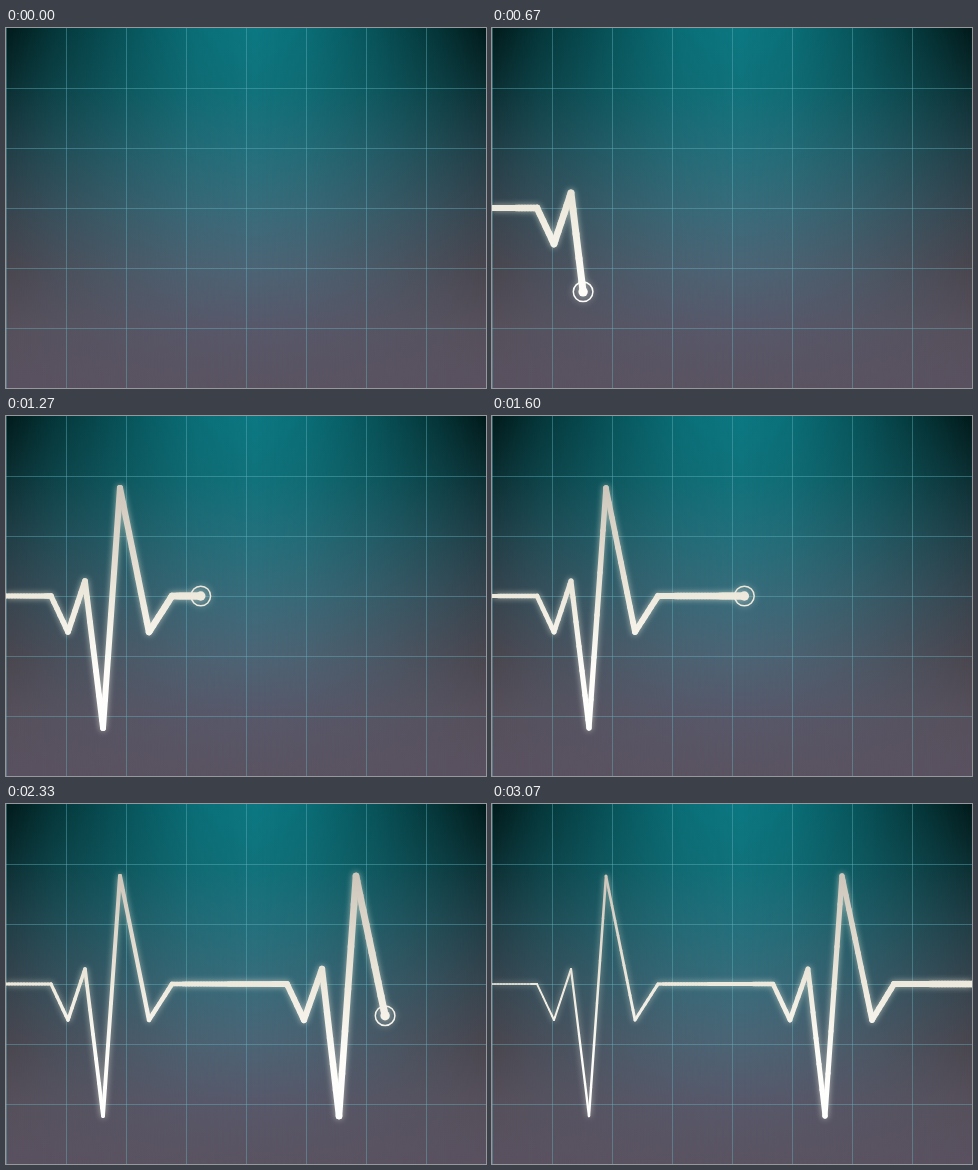
An HTML page with a canvas for the animation above (3.14 s loop, 480x360 px).

```html
<!DOCTYPE html>
<html lang="en">
<head>
<meta charset="utf-8">
<title>Heartbeat monitor</title>
<style>
html, body { margin: 0; width: 100%; height: 100%; overflow: hidden; }
body {
  position: relative;
  background: linear-gradient(#021a1a, #0c2f33 17%, #213d45 33%, #37444e 50%, #4a464f 67%, #56505b 83%, #5a5160);
}
.light, .grid, canvas { position: absolute; left: 0; top: 0; width: 480px; height: 360px; }
.light {
  --fade: linear-gradient(90deg, transparent, rgba(0,0,0,.3) 10%, rgba(0,0,0,.62) 25%, rgba(0,0,0,.9) 40%,
    #000 52%, rgba(0,0,0,.9) 62%, rgba(0,0,0,.6) 77%, rgba(0,0,0,.28) 90%, transparent);
  background: linear-gradient(#0b7882, #10727b 17%, #22707c 33%, #386c7b 50%, #4c6475 67%, #57586a 83%, #5a5361);
  -webkit-mask-image: var(--fade);
  mask-image: var(--fade);
}
.grid {
  --line: rgba(100,180,192,.42) 0 1px, transparent 1px 60px;
  background:
    repeating-linear-gradient(90deg, var(--line)),
    repeating-linear-gradient(var(--line)) 0 60px / 100% 100% no-repeat;
}
canvas { filter: drop-shadow(0 0 3px rgba(238,242,225,.6)); }
</style>
</head>
<body>
<div class="light"></div>
<div class="grid"></div>
<canvas width="480" height="360"></canvas>
<script>
const LOOP = 3140, FPS = 15, SPEED = 11.52, START = -24.1;
const ctx = document.querySelector('canvas').getContext('2d');

const trace = [
  [-40, 180], [45, 180], [62, 216], [79, 165], [97, 312], [114, 72], [143, 216], [166, 180],
  [281, 180], [298, 216], [316, 165], [333, 312], [350, 72], [380, 216], [402, 180], [540, 180]
];

const ink = ctx.createLinearGradient(0, 72, 0, 312);
ink.addColorStop(0, '#cec6ba');
ink.addColorStop(.45, '#eee9dd');
ink.addColorStop(.75, '#fdfcf8');
ink.addColorStop(1, '#ffffff');
ctx.lineCap = 'round';

function heightAt(x) {
  const i = trace.findIndex(p => p[0] >= x);
  if (i < 1) return 180;
  const [x0, y0] = trace[i - 1], [x1, y1] = trace[i];
  return y0 + (y1 - y0) * (x - x0) / (x1 - x0);
}

// The line thins out steadily with its distance behind the head.
function drawTrail(head) {
  const stops = trace.map(p => p[0]).filter(x => x < head);
  for (let x = -12; x < head; x += 3) stops.push(x);
  stops.push(head);
  stops.sort((a, b) => a - b);
  for (let i = 1; i < stops.length; i++) {
    const a = stops[i - 1], b = stops[i];
    ctx.lineWidth = Math.max(.8, 7 - .13 * (head - b) / SPEED);
    ctx.beginPath();
    ctx.moveTo(a, heightAt(a));
    ctx.lineTo(b, heightAt(b));
    ctx.stroke();
  }
}

function drawHead(x) {
  const y = heightAt(x);
  ctx.beginPath();
  ctx.arc(x, y, 4.7, 0, 7);
  ctx.fill();
  ctx.lineWidth = 1.5;
  ctx.beginPath();
  ctx.arc(x, y, 9.8, 0, 7);
  ctx.stroke();
}

function draw(now) {
  const step = Math.floor((now % LOOP + 3.4) * FPS / 1000);
  const head = START + SPEED * step;
  ctx.clearRect(0, 0, 480, 360);
  ctx.strokeStyle = ctx.fillStyle = ink;
  if (step > 0) {
    drawTrail(head);
    drawHead(head);
  }
  requestAnimationFrame(draw);
}
draw(0);
</script>
</body>
</html>
```
